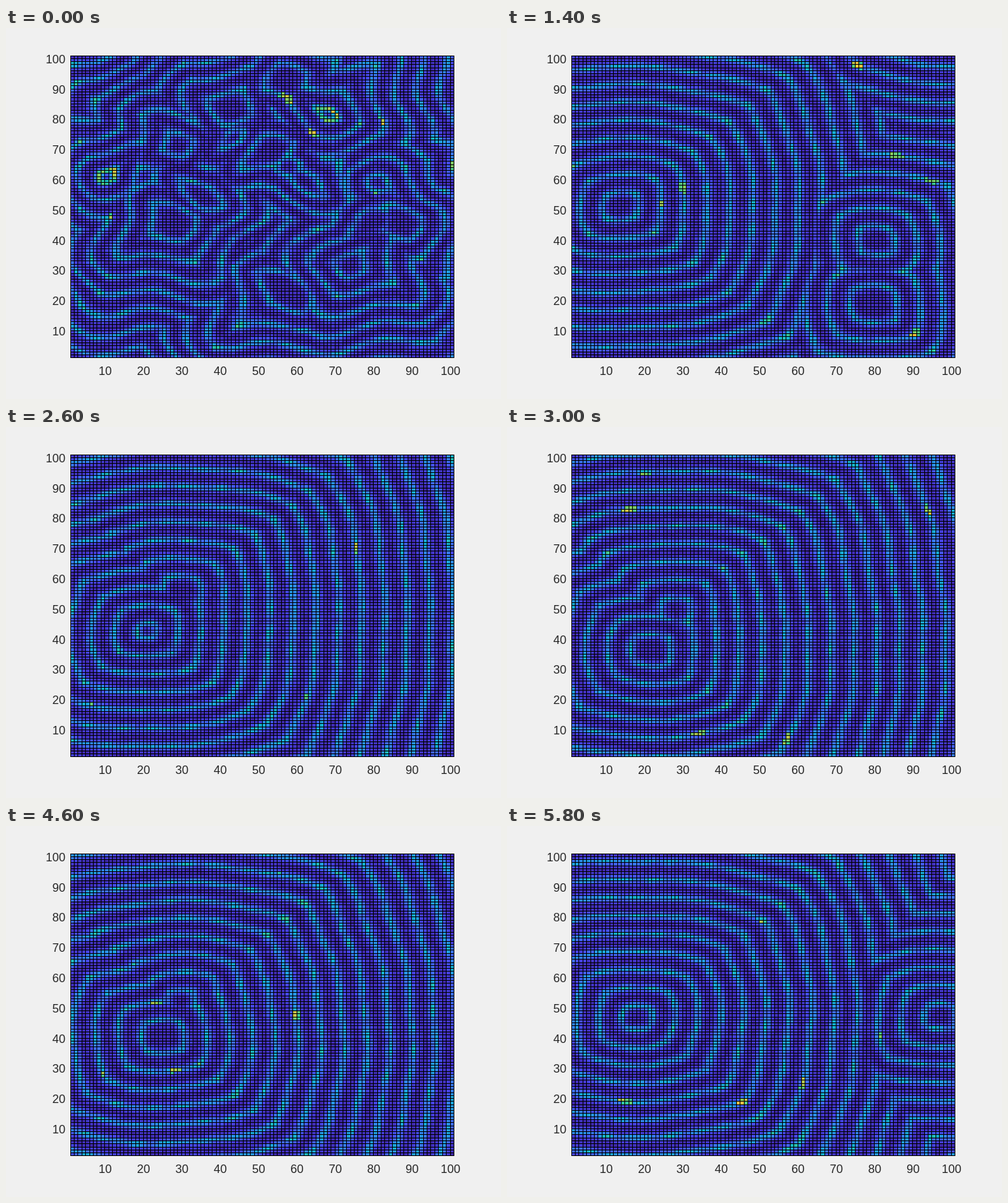
These frames come from a looping animation (700 by 525 pixels, 6000 ms). An HTML page with a canvas:

```html
<!DOCTYPE html>
<html lang="en">
<head>
<meta charset="utf-8">
<title>Excitable medium</title>
<style>
html, body { margin: 0; width: 100%; height: 100%; overflow: hidden; background: #f0f0f0; }
canvas { display: block; }
</style>
</head>
<body>
<canvas id="stage" width="700" height="525"></canvas>
<script>
const ctx = document.getElementById('stage').getContext('2d');
const N = 100, LEFT = 91, TOP = 39, CW = 5.425, CH = 4.27875;
const WAVE = 5.95, FRAME = 200, COUNT = 30, FADE = 9;
const edgeX = i => Math.floor(LEFT + i * CW);
const edgeY = j => Math.floor(TOP + j * CH);
const wrap = t => t - WAVE * Math.round(t / WAVE);
const lerp = (a, b, f) => a + (b - a) * f;

function hash(a, b, c) {
  const s = Math.sin(a * 127.1 + b * 311.7 + c * 74.7) * 43758.5453;
  return s - Math.floor(s);
}

const parula = [
  [62, 38, 168], [71, 69, 233], [63, 110, 254], [39, 150, 235],
  [18, 177, 205], [55, 200, 151], [145, 202, 89], [251, 188, 62], [249, 251, 21]
];
function colour(v) {
  const p = Math.min(.999, Math.max(0, v)) * 8, k = Math.floor(p);
  return `rgb(${parula[k].map((c, n) => Math.round(lerp(c, parula[k + 1][n], p - k)))})`;
}

// Wandering pacemakers. Each key: frame, x, y, radius of the leading front
const leader = [
  [0, 13, 63, 2], [4, 9.7, 53, 11.4], [11, 20, 48.5, 23.4], [15, 22, 36.5, 29.1],
  [19, 23.5, 42.5, 37.4], [23, 25, 40.5, 41.3], [29, 18, 47, 51.6]
];
const follower = [
  [0, 15, 55, -60], [11, 32, 62, 12], [15, 28, 50, 21.8],
  [19, 32, 52, 28.9], [23, 30, 52, 33.4], [29, 25, 52, 15]
];
// Short-lived pacemakers. Each: strongest frame, x, y, front radius at that frame
const bursts = [
  [0, 27.5, 71, 4], [0, 26, 44.5, 6], [0, 68, 84, 8], [0, 76, 32, 10],
  [4, 80, 18.5, 9.4], [4, 80.3, 39.5, 8], [4, 104, 126, 20], [29, 97, 47, 10.2]
];
for (let k = 0; k < 14; k++)
  bursts.push([0, 30 + 70 * hash(k, 1, 3), 100 * hash(k, 2, 3), 6 * hash(k, 3, 3)]);

function along(path, frame) {
  let k = 0;
  while (k < path.length - 2 && path[k + 1][0] <= frame) k++;
  const a = path[k], b = path[k + 1], f = (frame - a[0]) / (b[0] - a[0]);
  return [1, 2, 3].map(n => lerp(a[n], b[n], f));
}

const pacemakers = frame => [
  along(leader, frame), along(follower, frame),
  ...bursts.map(([peak, x, y, front]) => [x, y, front - FADE * Math.abs(frame - peak)])
];

function level(x, y, frame, sources) {
  // Fronts start tangled and straighten out
  const bend = .35 + 2.2 * Math.max(0, 1 - frame / 4);
  const px = x + bend * Math.sin(y * .23 + frame * .4), py = y + bend * Math.sin(x * .21 + frame);
  let best = 1e9, dist = 0, corner = 0;
  for (const [sx, sy, front] of sources) {
    const dx = Math.abs(px - sx), dy = Math.abs(py - sy);
    const big = Math.max(dx, dy, .01), small = Math.min(dx, dy);
    const d = big + .22 * small * small / big;
    if (d - front < best) {
      best = d - front;
      dist = d;
      corner = big > 5 && small / big > .93 ? .13 : 0;
    }
  }
  const w = wrap(best), u = Math.abs(w), radius = dist - w;
  if (radius < 1.2) return .03;
  const ripple = Math.sin(x * .73 + frame) * Math.sin(y * .71 + frame * 1.7)
    + .5 * Math.sin(x * 1.1 - y * .9 + frame);
  const birth = radius < 2.2 ? .35 : 0;
  const peak = .27 + .11 * ripple + corner + birth;
  return .02 + .12 * (1 - u / 3) + peak * Math.exp(-u * u / .95)
    + .06 * (hash(x, y, frame) - .5);
}

function drawFrame(frame) {
  const sources = pacemakers(frame);
  const sparks = Array.from({ length: 7 }, (_, k) =>
    [1 + N * hash(k, 1, frame), 1 + N * hash(k, 2, frame)]);
  ctx.fillStyle = '#f0f0f0';
  ctx.fillRect(0, 0, 700, 525);
  for (let j = 0; j < N; j++) {
    const y = N + .5 - j, top = edgeY(j);
    for (let i = 0; i < N; i++) {
      const x = i + 1.5, left = edgeX(i);
      let v = level(x, y, frame, sources);
      if (v > .25 && sparks.some(([sx, sy]) => Math.hypot(x - sx, y - sy) < 2)) v += .35;
      ctx.fillStyle = colour(v);
      ctx.fillRect(left, top, edgeX(i + 1) - left, edgeY(j + 1) - top);
    }
  }
  ctx.fillStyle = '#000';
  for (let k = 0; k <= N; k++) {
    ctx.fillRect(edgeX(k), TOP, 1, edgeY(N) - TOP + 1);
    ctx.fillRect(LEFT, edgeY(k), edgeX(N) - LEFT + 1, 1);
  }
  drawLabels();
}

function drawLabels() {
  ctx.fillStyle = '#262626';
  ctx.font = '16.67px "Liberation Sans", Arial, sans-serif';
  for (let n = 10; n <= N; n += 10) {
    ctx.textAlign = 'center';
    ctx.fillText(n, LEFT + .5 + (n - 1) * CW, 491);
    ctx.textAlign = 'right';
    ctx.fillText(n, 84, 435 - (n - 10) * CH);
  }
}

let shown = -1;
const start = performance.now();
function tick() {
  const frame = Math.floor((performance.now() - start) / FRAME) % COUNT;
  if (frame !== shown) drawFrame(shown = frame);
  requestAnimationFrame(tick);
}
tick();
</script>
</body>
</html>
```
